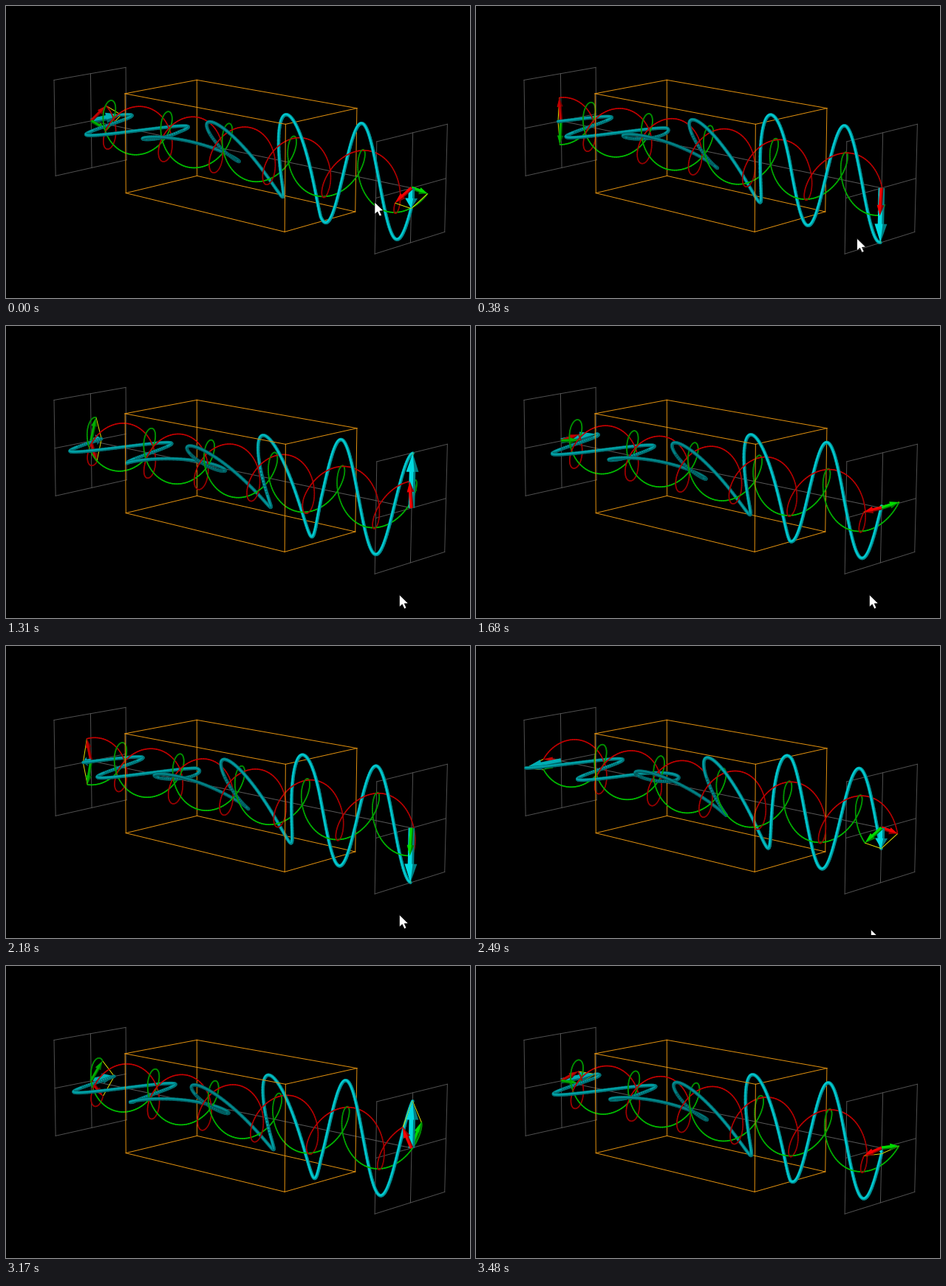
Write a matplotlib script that moves like this. It is 628 px wide and 396 px high and loops after 3540 ms.

```python
import numpy as np
import matplotlib.pyplot as plt
from matplotlib.animation import FuncAnimation
from matplotlib.collections import LineCollection, PolyCollection
from matplotlib.patches import Polygon, Rectangle

W, H, PX = 628, 396, 0.72          # stage size, points per pixel
TICK, LOOP = 20, 3540
POSES, STEP, START = 45, 16, 202   # two turns of the field per loop, degrees
IN, OUT = 0.25, 0.75               # ends of the medium along the axis
TURNS = 5.025                      # wavelengths along the axis in vacuum
EXTRA = 0.5                        # extra turns of the red wave in the medium

holds = [130 if k == 0 or k % 4 == 1 else 60 for k in range(POSES)]
starts = np.cumsum([0] + holds[:-1])

# Camera: fitted to the four squares across the axis (s along, u across, v up)
CORNERS = [(-1, 1), (1, 1), (1, -1), (-1, -1)]
SQUARES = {
    0: [(64, 100), (162, 83), (162, 208), (67, 230)],
    IN: [(161, 118), (258, 100), (258, 230), (162, 253)],
    OUT: [(377, 160), (474, 138), (473, 278), (377, 306)],
    1: [(502, 183), (597, 160), (593, 306), (498, 336)],
}


def fit_camera():
    rows, rhs = [], []
    for s, quad in SQUARES.items():
        for (u, v), (x, y) in zip(CORNERS, quad):
            x, y = x + 0.5, y + 0.5    # pixel centres
            rows.append([s, u, v, 1, 0, 0, 0, 0, -x * s, -x * u, -x * v])
            rows.append([0, 0, 0, 0, s, u, v, 1, -y * s, -y * u, -y * v])
            rhs += [x, y]
    sol = np.linalg.lstsq(np.array(rows, float), np.array(rhs, float), rcond=None)[0]
    return np.append(sol, 1).reshape(3, 4)


CAM = fit_camera()


def project(s, u, v):
    s, u, v = np.broadcast_arrays(s, u, v)
    x, y, w = np.tensordot(CAM, np.stack([s, u, v, np.ones(s.shape)]), 1)
    return np.stack([x / w, y / w], -1), w


def smooth(x):
    x = np.clip(x, 0, 1)
    return x * x * (3 - 2 * x)


fig = plt.figure(figsize=(W / 100, H / 100), dpi=100, facecolor="black")
ax = fig.add_axes([0, 0, 1, 1])
ax.set(xlim=(0, W), ylim=(H, 0))
ax.axis("off")


def wire(a, b, color, z=1):
    p, _ = project(*np.array([a, b], float).T)
    ax.plot(*p.T, color=color, lw=PX, zorder=z, snap=False)


GRAY, ORANGE = "#505050", "#e0900f"
for s in (0, 1):
    for (a, b), (c, d) in zip(CORNERS, CORNERS[1:] + CORNERS[:1]):
        wire((s, a, b), (s, c, d), GRAY)
    wire((s, -1, 0), (s, 1, 0), GRAY)
    wire((s, 0, -1), (s, 0, 1), GRAY)
wire((0, 0, 0), (1, 0, 0), "#585858")
for (a, b), (c, d) in zip(CORNERS, CORNERS[1:] + CORNERS[:1]):
    for s in (IN, OUT):
        wire((s, a, b), (s, c, d), ORANGE, 4 if a == c == -1 else 2)
    wire((IN, a, b), (OUT, a, b), ORANGE, 4 if a == -1 else 2)

# Waves
S = np.linspace(0, 1, 401)
MID = (S[1:] + S[:-1]) / 2
CYAN_LIGHT = 0.64 + 0.36 * smooth((MID - 0.42) / 0.3) + 0.16 * smooth((0.4 - MID) / 0.2)
RED, GREEN, CYAN = np.eye(3)[0], np.eye(3)[1], np.array([0, 1, 1.03])


def fields(s, k):
    """Red and green rotating vectors at s, as (u, v) pairs."""
    turn = TURNS * (1 - s)
    base = START + STEP * k
    r = np.radians(base + 360 * (turn + EXTRA * np.clip((OUT - s) / (OUT - IN), 0, 1)))
    g = np.radians(180 - base - 360 * turn)
    return (0.5 * np.array([np.cos(r), np.sin(r)]),
            0.5 * np.array([np.cos(g), np.sin(g)]))


def strand(uv, color, light, width, lift=0.0, shift=0.0):
    p, w = project(S, *uv)
    p = p + shift
    segs = np.stack([p[:-1], p[1:]], 1)
    depth = (w[1:] + w[:-1]) / 2 - lift
    rgb = np.clip(np.outer(light, color), 0, 1)
    return segs, depth, rgb, np.full(len(segs), width * PX)


waves = LineCollection([], capstyle="round", zorder=3)
ax.add_collection(waves)


def draw_waves(k):
    red, green = fields(S, k)
    total = red + green
    parts = [
        strand(red, RED, 0.68 + 0.2 * red[1, 1:], 1.6),
        strand(green, GREEN, 0.64 - 0.2 * green[1, 1:], 1.7),
        strand(total, CYAN, 0.54 * CYAN_LIGHT, 4.6),
        strand(total, CYAN, 0.8 * CYAN_LIGHT, 2.2, 0.0015, -0.5),
    ]
    segs, depth, rgb, width = (np.concatenate(q) for q in zip(*parts))
    order = np.argsort(-depth)
    waves.set_segments(segs[order])
    waves.set_color(rgb[order])
    waves.set_linewidth(width[order])


# Arrows at both ends
ends = []
for s, z, scale, light in ((0, 2.5, 0.85, 0.8), (1, 5, 1.0, 1.0)):
    frame = LineCollection([], colors="#dcdc00", linewidths=PX, zorder=z)
    arrows = PolyCollection([], linewidths=0, zorder=z + 0.1)
    ax.add_collection(frame)
    ax.add_collection(arrows)
    ends.append((s, scale, light, frame, arrows))


def arrow_halves(tail, tip, width, size):
    """Shadowed outline and lit side of an arrow."""
    d = tip - tail
    length = np.hypot(*d)
    if length < 0.5:
        return []
    d = d / length
    n = np.array([d[1], -d[0]])
    if n @ (1, 0.6) > 0:
        n = -n
    half = width / 2 * min(1, size / 0.25)
    neck = tip - d * min(3 * width, 0.5 * length)

    def shape(a, b):
        return np.array([tail + n * half * a, neck + n * half * a,
                         neck + n * half * 2 * a, tip,
                         neck + n * half * 2 * b, neck + n * half * b,
                         tail + n * half * b])

    return [shape(1, -1), shape(1, -0.3)]


def draw_ends(k):
    for s, scale, light, frame, arrows in ends:
        red, green = fields(s, k)
        total = red + green
        tail = project(s, 0, 0)[0]
        tips = [project(s, *q)[0] for q in (red, green, total)]
        frame.set_segments([[tips[0], tips[2]], [tips[1], tips[2]]])
        items = [(red, tips[0], RED, 4.8), (green, tips[1], GREEN * 0.9, 4.8),
                 (total, tips[2], CYAN * 0.9, 8.4)]
        items.sort(key=lambda it: -it[0][0])
        polys, colors = [], []
        for uv, tip, color, width in items:
            halves = arrow_halves(tail, tip, width * scale, np.hypot(*uv))
            polys += halves
            colors += [color * f * light for f in (0.55, 0.95)][:len(halves)]
        arrows.set_verts(polys)
        arrows.set_facecolor(np.clip(colors, 0, 1))


# Mouse pointer
POINTER = np.array([(0, 0), (0, 16.5), (3.8, 13), (6.6, 19), (9.4, 17.8),
                    (6.8, 12), (11.8, 11.6)])
pointer = Polygon(POINTER, fc="white", ec="black", lw=0.6 * PX, zorder=8)
ax.add_patch(pointer)
ax.add_patch(Rectangle((0, 392), W, 4, color="black", lw=0, zorder=9))


def draw_pointer(k):
    go = smooth(k / 8)
    leave = max(0, k - 29)
    pointer.set_xy(POINTER + (499 + 33.5 * go + leave, 266 + 98.5 * go + 10 * leave))
    pointer.set_visible(leave < 3)


def update(i):
    k = int(np.searchsorted(starts, i * TICK + TICK // 2, "right")) - 1
    draw_waves(k)
    draw_ends(k)
    draw_pointer(k)
    return []


anim = FuncAnimation(fig, update, frames=LOOP // TICK, interval=TICK,
                     repeat=True, repeat_delay=0, blit=False)
plt.show()
```
